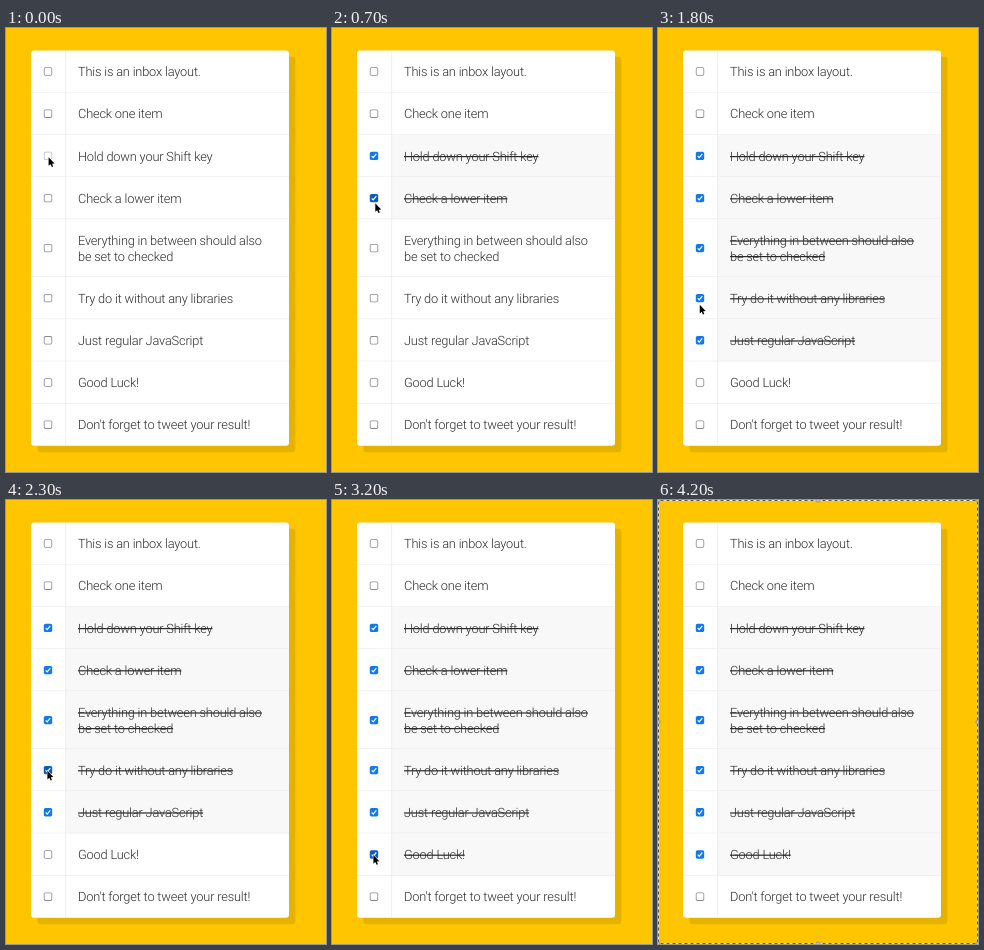
Recreate the animation shown at these times as an HTML page with a canvas. Size 320 by 444 pixels, loop 5270 ms.

```html
<!DOCTYPE html>
<html lang="en">
<head>
<meta charset="utf-8">
<title>Inbox checklist</title>
<style>
  html, body { margin: 0; width: 100%; height: 100%; overflow: hidden; background: #ffc600; }
  canvas { display: block; width: 320px; height: 444px; }
</style>
</head>
<body>
<canvas id="stage"></canvas>
<script>
const W = 320, H = 444, LOOP = 5270, STEP = 100;
const CARD = { x: 25, y: 22.4, w: 258, h: 395.4 };
const ROW_H = 42.2, LINE_H = 15.6, BOX_X = 42, BOX = 8.4, RULE_X = 59.4, TEXT_X = 72;
const SELECT_AT = 4000, SELECT_END = 4200;

// clicks: times at which the row toggles
const rows = [
  { text: 'This is an inbox layout.', clicks: [] },
  { text: 'Check one item', clicks: [] },
  { text: 'Hold down your Shift key', clicks: [100] },
  { text: 'Check a lower item', clicks: [700] },
  { text: 'Everything in between should also\nbe set to checked', clicks: [1400] },
  { text: 'Try do it without any libraries', clicks: [1400, 2000, 2300] },
  { text: 'Just regular JavaScript', clicks: [1400] },
  { text: 'Good Luck!', clicks: [2700] },
  { text: "Don't forget to tweet your result!", clicks: [] }
];

let bottom = CARD.y;
for (const r of rows) {
  r.lines = r.text.split('\n');
  r.y = bottom;
  r.h = ROW_H + (r.lines.length - 1) * LINE_H;
  r.mid = r.y + r.h / 2;
  bottom += r.h;
}

// The pointer rests between these moves.
const home = { x: 42.6, y: 129.2 };
const moves = [
  { from: 200, to: 600, x: 43.3, y: 175.2 },
  { from: 700, to: 900, x: 43.3, y: 290 },
  { from: 1000, to: 1300, x: 43.6, y: 308.7 },
  { from: 1500, to: 1900, x: 41.4, y: 270.8 },
  { from: 2300, to: 2600, x: 41.4, y: 355 }
];

const canvas = document.getElementById('stage');
const ctx = canvas.getContext('2d');
const dpr = window.devicePixelRatio || 1;
canvas.width = W * dpr;
canvas.height = H * dpr;

function ease(k) {
  k = Math.min(1, Math.max(0, k));
  return k * k * (3 - 2 * k);
}

function pointerAt(t) {
  let { x, y } = home;
  for (const m of moves) {
    const k = ease((t - m.from) / (m.to - m.from));
    x += (m.x - x) * k;
    y += (m.y - y) * k;
  }
  return { x, y };
}

function fillRect(x, y, w, h, color) {
  ctx.fillStyle = color;
  ctx.fillRect(x, y, w, h);
}

function fillRound(x, y, w, h, r, color) {
  ctx.beginPath();
  ctx.roundRect(x, y, w, h, r);
  ctx.fillStyle = color;
  ctx.fill();
}

function trace(points) {
  ctx.beginPath();
  points.forEach(([x, y]) => ctx.lineTo(x, y));
}

function drawBox(mid, checked, hover, pressed) {
  const x = BOX_X - BOX / 2, y = mid - BOX / 2;
  if (!checked) {
    fillRound(x, y, BOX, BOX, 1.7, pressed ? '#bcbcbc' : '#8a8a8a');
    fillRound(x + 0.8, y + 0.8, BOX - 1.6, BOX - 1.6, 1, '#fff');
    return;
  }
  fillRound(x, y, BOX, BOX, 1.7, hover ? '#0a5bc4' : '#0f78f5');
  trace([[BOX_X - 2.3, mid + 0.2], [BOX_X - 0.8, mid + 1.8], [BOX_X + 2.3, mid - 2]]);
  ctx.strokeStyle = '#fff';
  ctx.lineWidth = 1.2;
  ctx.stroke();
}

function drawRow(r, t, tip) {
  const checked = r.clicks.filter(c => c <= t).length % 2 === 1;
  const hover = tip && Math.abs(tip.x - BOX_X) < 5.5 && Math.abs(tip.y - r.mid) < 5.5;
  const pressed = hover && r.clicks.includes(t + STEP);

  if (checked) fillRect(RULE_X, r.y, CARD.x + CARD.w - RULE_X, r.h, '#f8f8f9');
  if (r !== rows[rows.length - 1]) fillRect(CARD.x, r.y + r.h - 0.7, CARD.w, 0.7, '#ececec');
  drawBox(r.mid, checked, hover, pressed);

  r.lines.forEach((line, i) => {
    const base = r.mid + 4.6 + (i - (r.lines.length - 1) / 2) * LINE_H;
    ctx.fillStyle = '#2b2b2b';
    ctx.fillText(line, TEXT_X, base);
    if (checked) fillRect(TEXT_X, base - 4.5, ctx.measureText(line).width, 1.2, '#2b2b2b');
  });
}

function drawPointer({ x, y }) {
  ctx.save();
  ctx.translate(x, y);
  ctx.scale(0.85, 0.85);
  trace([[0, 0], [0, 10.2], [2.3, 8.2], [3.8, 11.5], [5.4, 10.8], [4, 7.6], [7, 7.3]]);
  ctx.closePath();
  ctx.lineJoin = 'round';
  ctx.strokeStyle = '#fff';
  ctx.lineWidth = 1.2;
  ctx.stroke();
  ctx.fillStyle = '#000';
  ctx.fill();
  ctx.restore();
}

function drawHandle(x, y) {
  ctx.beginPath();
  ctx.arc(x, y, 2.2, 0, Math.PI * 2);
  ctx.fillStyle = '#c4c4c4';
  ctx.fill();
  ctx.strokeStyle = '#777';
  ctx.lineWidth = 0.6;
  ctx.stroke();
}

function drawSelection(t) {
  ctx.lineWidth = 1;
  ctx.strokeStyle = '#ece6d2';
  ctx.strokeRect(0.5, 0.5, W - 1, H - 1);
  ctx.setLineDash([3, 3]);
  ctx.lineDashOffset = (SELECT_AT - Math.min(t, SELECT_END)) / STEP;
  ctx.strokeStyle = '#5a564a';
  ctx.strokeRect(0.5, 0.5, W - 1, H - 1);
  ctx.setLineDash([]);
  for (let i = 0; i < 9; i++) {
    if (i !== 4) drawHandle((i % 3) * W / 2, Math.floor(i / 3) * H / 2);
  }
}

function draw(t) {
  const selecting = t >= SELECT_AT;
  const tip = selecting ? null : pointerAt(t);
  ctx.setTransform(dpr, 0, 0, dpr, 0, 0);
  ctx.font = '300 12.8px Roboto, "Liberation Sans", sans-serif';
  ctx.letterSpacing = '-0.18px';
  ctx.textRendering = 'geometricPrecision';

  fillRect(0, 0, W, H, '#ffc600');
  fillRound(CARD.x + 6.4, CARD.y + 6.4, CARD.w, CARD.h, 3.2, 'rgba(0, 0, 0, 0.1)');
  fillRound(CARD.x, CARD.y, CARD.w, CARD.h, 3.2, '#fff');
  rows.forEach(r => drawRow(r, t, tip));
  fillRect(RULE_X, CARD.y, 0.7, CARD.h, '#e2e8f3');

  if (tip) drawPointer(tip);
  if (selecting) drawSelection(t);
}

const start = performance.now();
function frame(now) {
  const t = Math.max(0, now - start) % LOOP;
  draw(Math.floor(t / STEP) * STEP);
  requestAnimationFrame(frame);
}
draw(0);
requestAnimationFrame(frame);
</script>
</body>
</html>
```
